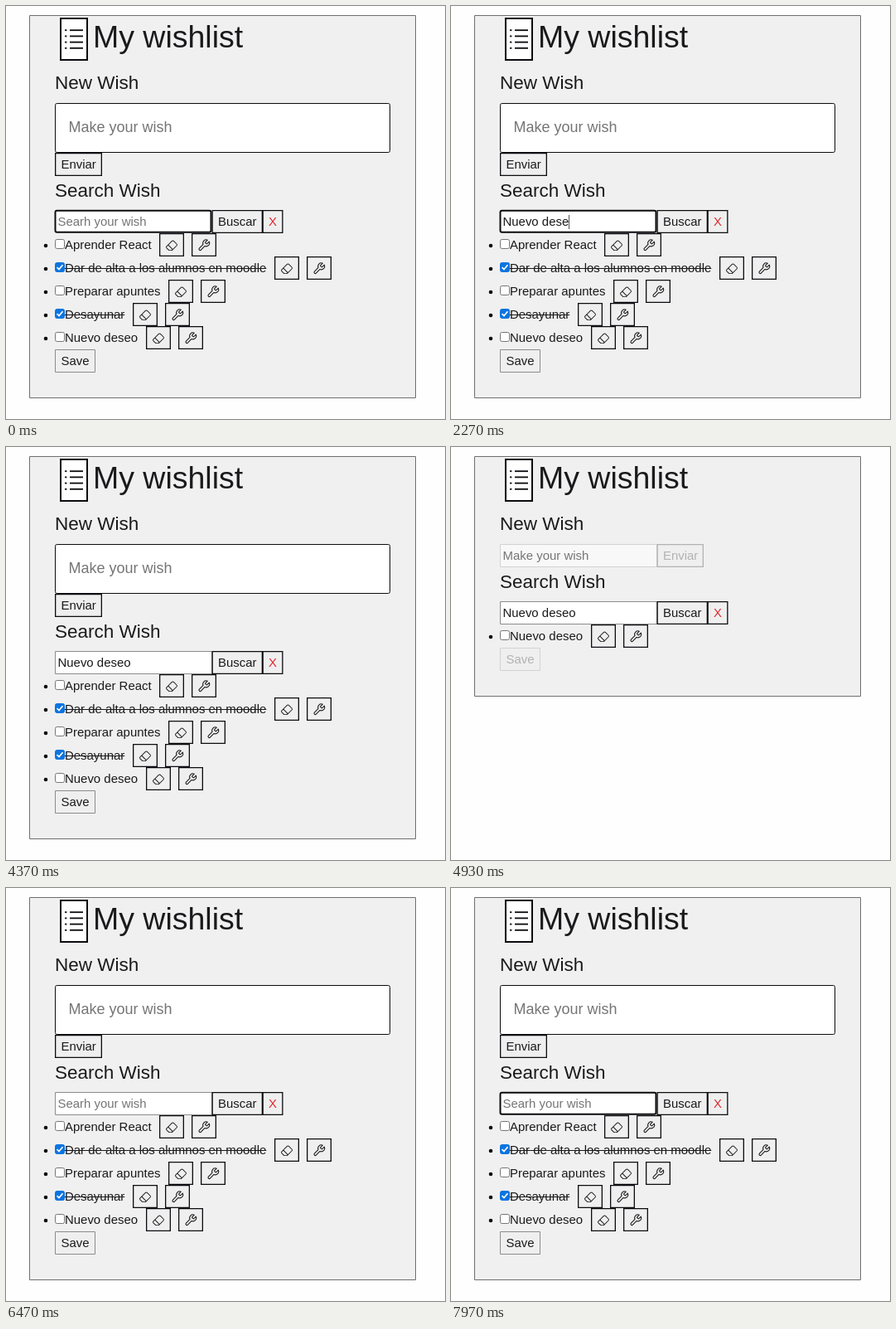
Write an HTML page with a canvas that moves like this. It is 530 px wide and 498 px high and loops after 8000 ms.

```html
<!DOCTYPE html>
<html lang="es">
<head>
<meta charset="utf-8">
<title>My wishlist</title>
<style>
  html, body { margin: 0; width: 100%; height: 100%; overflow: hidden; background: #fefefe; }
  canvas { display: block; width: 530px; height: 498px; }
</style>
</head>
<body>
<canvas id="stage" width="530" height="498"></canvas>
<script>
const ctx = document.getElementById('stage').getContext('2d');
const LOOP = 8000;
const FONT = '"Liberation Sans", Arial, sans-serif';
const C = {
  page: '#fefefe', panel: '#f0f0f0', panelEdge: '#6e6e6e', field: '#ffffff',
  ink: '#1a1a1c', line: '#0c0c10', hint: '#757575', button: '#efefef',
  soft: '#8c8c8c', faint: '#d2d2d2', off: '#b2b2b2', red: '#e02a2e', blue: '#0c74e0'
};
const BLUR = 4290, FILTER = 4440, RESET = 6300, REFOCUS = 7250;
const QUERY = 'Nuevo deseo';
const KEYS = [190, 320, 460, 600, 730, 870, 1250, 1530, 1790, 2060, 2400];
const WISHES = [
  ['Aprender React', false],
  ['Dar de alta a los alumnos en moodle', true],
  ['Preparar apuntes', false],
  ['Desayunar', true],
  ['Nuevo deseo', false]
];
const ERASER = new Path2D('M8.086 2.207a2 2 0 0 1 2.828 0l3.879 3.879a2 2 0 0 1 0 2.828l-5.5 5.5A2 2 0 0 1 7.879 15H5.12a2 2 0 0 1-1.414-.586l-2.5-2.5a2 2 0 0 1 0-2.828zm2.121.707a1 1 0 0 0-1.414 0L4.16 7.547l5.293 5.293 4.633-4.633a1 1 0 0 0 0-1.414zM8.746 13.547 3.453 8.254 1.914 9.793a1 1 0 0 0 0 1.414l2.5 2.5a1 1 0 0 0 .707.293H7.88a1 1 0 0 0 .707-.293z');
const WRENCH = new Path2D('M14.7 6.3a1 1 0 0 0 0 1.4l1.6 1.6a1 1 0 0 0 1.4 0l3.77-3.77a6 6 0 0 1-7.94 7.94l-6.91 6.91a2.12 2.12 0 0 1-3-3l6.91-6.91a6 6 0 0 1 7.94-7.94l-3.76 3.76z');

function text(str, x, y, size = 14.95, color = C.ink) {
  ctx.font = `${size}px ${FONT}`;
  ctx.fillStyle = color;
  ctx.fillText(str, x, y);
  return ctx.measureText(str).width;
}

// Bordered box whose outer edge is x, y, w, h.
function box(x, y, w, h, fill, edge, line = 1, radius = 0) {
  const d = line / 2;
  ctx.beginPath();
  ctx.roundRect(x + d, y + d, w - line, h - line, radius);
  ctx.fillStyle = fill;
  ctx.fill();
  ctx.strokeStyle = edge;
  ctx.lineWidth = line;
  ctx.stroke();
}

function button(label, x, y, w, color = C.ink, edge = C.line, line = 1.3) {
  box(x, y, w, 28, C.button, edge, line);
  text(label, x + 7.5, y + 19, undefined, color);
}

function icon(path, x, y, scale, stroked) {
  ctx.save();
  ctx.translate(x, y);
  ctx.scale(scale, scale);
  ctx.fillStyle = ctx.strokeStyle = C.ink;
  ctx.lineWidth = 1.6;
  ctx.lineJoin = 'round';
  if (stroked) ctx.stroke(path); else ctx.fill(path);
  ctx.restore();
}

function header() {
  box(65, 14, 34, 52, C.field, C.line, 2);
  ctx.fillStyle = C.line;
  for (let i = 0; i < 4; i++) {
    const y = 28.3 + i * 7.2;
    ctx.fillRect(77, y, 16, 1.8);
    ctx.fillRect(71, y, 2.4, 1.8);
  }
  text('My wishlist', 104.9, 50, 37.5);
  text('New Wish', 59, 99.5, 22.5);
}

function checkbox(x, y, on) {
  box(x, y, 12, 12, on ? C.blue : C.field, on ? C.blue : C.hint, 1, 2);
  if (!on) return;
  ctx.beginPath();
  ctx.moveTo(x + 2.6, y + 6.2);
  ctx.lineTo(x + 5, y + 8.6);
  ctx.lineTo(x + 9.5, y + 3.3);
  ctx.strokeStyle = '#fff';
  ctx.lineWidth = 1.7;
  ctx.stroke();
}

function wishRow([label, done], top) {
  ctx.fillStyle = C.line;
  ctx.beginPath();
  ctx.arc(48, top + 15, 2.3, 0, Math.PI * 2);
  ctx.fill();
  checkbox(59, top + 7, done);
  const w = text(label, 71, top + 19);
  if (done) ctx.fillRect(71, top + 14, w, 1);
  const x = Math.round(80.6 + w);
  for (const bx of [x, x + 39]) box(bx, top, 30, 28, C.button, C.line, 1.3);
  icon(ERASER, x + 7.5, top + 7, 15 / 16);
  icon(WRENCH, x + 46, top + 6.5, 16 / 24, true);
}

function newWish(filtered) {
  if (filtered) {
    box(59, 117, 190, 28, '#f8f8f8', C.faint);
    text('Make your wish', 62.5, 136, undefined, C.hint);
    button('Enviar', 248.5, 117, 56.5, C.off, C.off);
  } else {
    box(59, 117, 405, 60, C.field, C.line, 1, 2);
    text('Make your wish', 75.5, 152, 18, C.hint);
    button('Enviar', 59, 177, 57);
  }
}

function search(y, query, focused, caret) {
  text('Search Wish', 59, y - 16.5, 22.5);
  if (focused) box(58.5, y - 0.3, 190, 28, C.field, C.line, 2, 2);
  else box(59, y, 190, 28, C.field, C.soft);
  const w = query ? text(query, 62.5, y + 19) : 0;
  if (!query) text('Searh your wish', 62.5, y + 19, undefined, C.hint);
  if (caret) {
    ctx.fillStyle = '#55555a';
    ctx.fillRect(Math.floor(62.5 + w), y + 6, 1, 17);
  }
  button('Buscar', 248.5, y, 61.5);
  button('X', 309.5, y, 25, C.red);
}

function draw(t) {
  const filtered = t >= FILTER && t < RESET;
  const focused = t < BLUR || t >= REFOCUS;
  const typed = KEYS.filter(k => k <= t).length;
  const query = t < RESET ? QUERY.slice(0, typed) : '';

  // The caret's blink restarts at each key press or focus.
  const since = t >= REFOCUS ? t - REFOCUS : typed ? t - KEYS[typed - 1] : t + 600;
  const caret = focused && since % 1000 < 500;

  const shift = filtered ? -60 : 0;
  const rows = filtered ? WISHES.filter(([label]) => label === QUERY) : WISHES;
  const listTop = 274 + shift;
  const saveTop = listTop + rows.length * 28;

  ctx.fillStyle = C.page;
  ctx.fillRect(0, 0, 530, 498);
  box(28, 11, 467, saveTop + 48, C.panel, C.panelEdge);
  header();
  newWish(filtered);
  search(246 + shift, query, focused, caret);
  rows.forEach((wish, i) => wishRow(wish, listTop + i * 28));
  button('Save', 59, saveTop, 49, filtered ? C.off : C.ink, filtered ? C.faint : C.soft, 1);
}

function tick(now) {
  draw(now % LOOP);
  requestAnimationFrame(tick);
}
draw(0);
requestAnimationFrame(tick);
</script>
</body>
</html>
```
